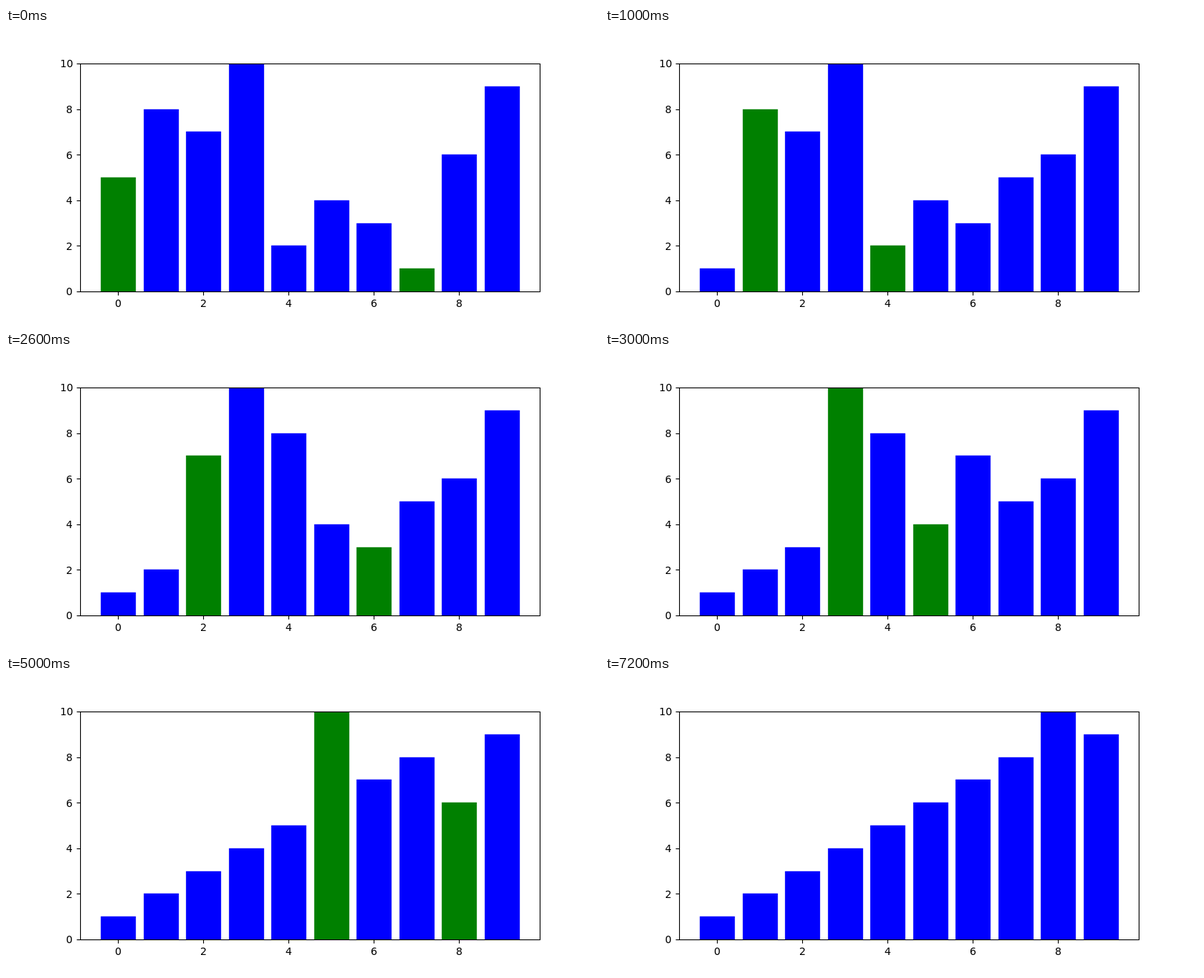
Animation, 800 px wide and 400 px high, one loop 8000 ms. Source, as an HTML page:

```html
<!DOCTYPE html>
<html lang="en">
<head>
<meta charset="utf-8">
<title>Selection sort</title>
<style>
  html, body { margin: 0; width: 100%; height: 100%; overflow: hidden; background: #fff; }
  svg { display: block; width: 800px; height: 400px; }
  text { font: 13.889px "DejaVu Sans", sans-serif; fill: #000; }
  .bar { stroke-width: 1.389; }
  .axis { fill: none; stroke: #000; stroke-width: 1.111; }
</style>
</head>
<body>
<svg viewBox="0 0 800 400">
  <clipPath id="plot"><rect x="100" y="48" width="620" height="308"/></clipPath>
  <g id="bars" clip-path="url(#plot)"></g>
  <g id="axes"><rect class="axis" x="100.5" y="48.5" width="620" height="308"/></g>
</svg>
<script>
const START = [5, 8, 7, 10, 2, 4, 3, 1, 6, 9];
const STEP = 1000, STEPS = 8;
const UNIT = 620 / 10.78;

const xAt = v => 100 + (v + 0.89) * UNIT;
const yAt = v => 356 - v * 30.8;
const snap = p => Math.floor(p + 0.5) + 0.5;

function add(parent, tag, attrs, text) {
  const el = document.createElementNS("http://www.w3.org/2000/svg", tag);
  for (const name in attrs) el.setAttribute(name, attrs[name]);
  if (text !== undefined) el.textContent = text;
  return parent.appendChild(el);
}

const axes = document.getElementById("axes");
for (let v = 0; v <= 10; v += 2) {
  const y = snap(yAt(v));
  add(axes, "path", { class: "axis", d: `M95.5 ${y}H100.5` });
  add(axes, "text", { x: v < 10 ? 81 : 73, y: Math.round(yAt(v) + 5.3) }, v);
  if (v < 10) {
    const x = snap(xAt(v));
    add(axes, "path", { class: "axis", d: `M${x} 356.5V361.5` });
    add(axes, "text", { x: Math.round(xAt(v) - 4.42), y: 377 }, v);
  }
}

const group = document.getElementById("bars");
const bars = START.map((_, i) => {
  const left = snap(xAt(i - 0.4));
  return add(group, "rect", { class: "bar", x: left, width: snap(xAt(i + 0.4)) - left });
});

const minFrom = (list, i) => list.indexOf(Math.min(...list.slice(i)));

function show(step) {
  const list = START.slice();
  for (let i = 0; i < step; i++) {
    const m = minFrom(list, i);
    [list[i], list[m]] = [list[m], list[i]];
  }
  const min = minFrom(list, step);
  bars.forEach((bar, i) => {
    const top = snap(yAt(list[i]));
    const color = min !== step && (i === step || i === min) ? "#008000" : "#0000ff";
    bar.setAttribute("y", top);
    bar.setAttribute("height", 356.5 - top);
    bar.setAttribute("fill", color);
    bar.setAttribute("stroke", color);
  });
}

const begin = performance.now();
let shown = -1;
function tick() {
  const step = Math.floor((performance.now() - begin) / STEP) % STEPS;
  if (step !== shown) show(shown = step);
  requestAnimationFrame(tick);
}
tick();
</script>
</body>
</html>
```
